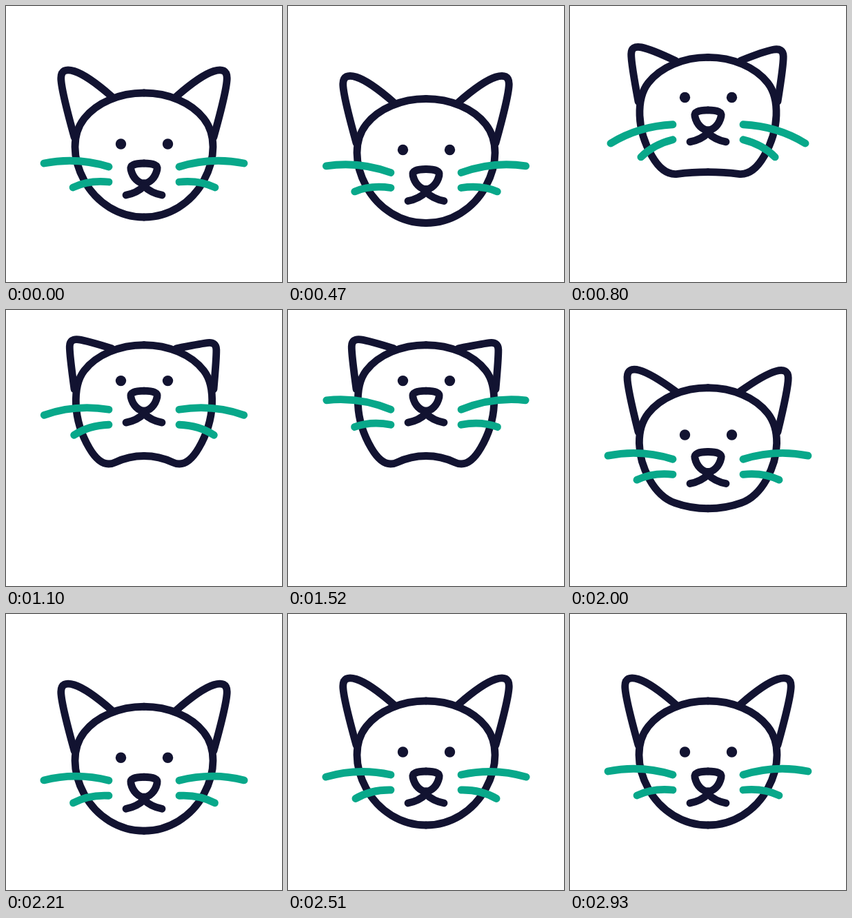
An HTML page with a canvas for the animation above (3.32 s loop, 400x400 px).

```html
<!DOCTYPE html>
<html lang="en">
<head>
<meta charset="utf-8">
<title>Jumping cat</title>
<style>
  html, body { margin: 0; width: 100%; height: 100%; overflow: hidden; background: #fff; }
  canvas { display: block; }
</style>
</head>
<body>
<canvas id="stage" width="400" height="400"></canvas>
<script>
const ctx = document.getElementById('stage').getContext('2d');
const INK = '#121331', TEAL = '#08a88a';
const LOOP = 3320, START = 230, END = 2930, STEP = 30;
const CROUCH = 200, LEAP = 470, APEX = 1310, DIP = 8.5;
const RAD = Math.PI / 180, MID = 200;

// How far each part climbs at the apex.
const SKULL = 87, CHIN = 107, EYES = 110, NOSE = 124, WHISKERS = 101;

const clamp = v => Math.min(1, Math.max(0, v));
const mix = (a, b, u) => a + (b - a) * u;

// Cubic timing curve: a gentle start and a long slow-down.
function ease(u) {
  const cubic = (a, b, s) => 3 * (1 - s) ** 2 * s * a + 3 * (1 - s) * s * s * b + s ** 3;
  let lo = 0, hi = 1;
  for (let i = 0; i < 24; i++) {
    const s = (lo + hi) / 2;
    if (cubic(0.233, 0.1875, s) < clamp(u)) lo = s; else hi = s;
  }
  return cubic(0, 1, lo);
}

// Whisker angle in degrees, as waves between turning points.
function swing(t) {
  const turns = [[CROUCH, 0], [440, -3.3], [770, 20], [1450, -5.3], [2540, 5], [END, 0]];
  const i = turns.findIndex(([end]) => t < end);
  if (i < 1) return 0;
  const [t0, a0] = turns[i - 1], [t1, a1] = turns[i];
  return mix(a0, a1, (1 - Math.cos(Math.PI * (t - t0) / (t1 - t0))) / 2);
}

// Smooth line from the first to the last point, guided by those between.
function curve(pts, color) {
  ctx.strokeStyle = color;
  ctx.beginPath();
  ctx.moveTo(...pts[0]);
  for (let i = 1; i < pts.length - 1; i++) {
    const [x, y] = pts[i], [nx, ny] = pts[i + 1];
    const last = i === pts.length - 2;
    ctx.quadraticCurveTo(x, y, last ? nx : (x + nx) / 2, last ? ny : (y + ny) / 2);
  }
  ctx.stroke();
}

// Draws a left-hand curve and its mirror image.
function pair(pts, color, move) {
  for (const right of [false, true]) {
    curve(pts.map((pt, i) => {
      const [x, y] = move(pt, right, i);
      return [right ? 2 * MID - x : x, y];
    }), color);
  }
}

// Guide point on an ellipse around the head centre: angle, height, rise, pull inwards.
const round = (deg, h, rise, pull = 0) => [
  MID - 100 * Math.cos(deg * RAD) / Math.cos(15 * RAD),
  200 + h * Math.sin(deg * RAD) / Math.cos(15 * RAD),
  rise, pull
];
const head = [
  [MID, 126, SKULL, 0],
  ...[-75, -45, -15].map(deg => round(deg, 74, SKULL)),
  round(15, 106, 70, 3), round(45, 106, 58, 12), round(75, 106, CHIN, 5),
  [MID, 306, CHIN, 0]
];
const ear = [
  [99, 190, SKULL, 0], [79.5, 120, 67, 13], [80, 88.5, 58, 13], [118, 100.5, 67, 0], [153, 131, SKULL, 0]
];
const nose = [[MID, 228], [179, 228], [183, 246], [194, 257], [MID, 257]];
const mouth = [[174, 274], [190, 271], [MID, 261]];
const whiskers = [
  [[149, 233], [102, 218.5], [55, 228]],
  [[149, 255], [120, 252], [97, 263]]
];

function draw(t) {
  // The landing repeats the take-off in reverse.
  const m = Math.min(t, 2 * APEX - t);
  const dip = DIP * ease((m - CROUCH) / (LEAP - CROUCH));
  const jump = ease((m - LEAP) / (APEX - LEAP));
  const lift = rise => dip - rise * jump;

  ctx.fillStyle = '#fff';
  ctx.fillRect(0, 0, 400, 400);
  ctx.lineWidth = 10.8;
  ctx.lineCap = ctx.lineJoin = 'round';

  const morph = ([x, y, rise, pull]) => [x + pull * jump, y + lift(rise)];
  pair(head, INK, morph);
  // The right ear folds a little further than the left.
  pair(ear, INK, (pt, right, i) => {
    const [x, y] = morph(pt);
    const fold = right && i > 0 && i < 4 ? jump : 0;
    return [x + 3 * fold, y + 5 * fold];
  });

  ctx.fillStyle = INK;
  for (const side of [-1, 1]) {
    ctx.beginPath();
    ctx.arc(MID + 0.5 + 34 * side, 200 + lift(EYES), 7.7, 0, 2 * Math.PI);
    ctx.fill();
  }

  for (const part of [nose, mouth]) pair(part, INK, ([x, y]) => [x, y + lift(NOSE)]);

  const c = Math.cos(swing(t) * RAD), s = Math.sin(swing(t) * RAD);
  for (const hair of whiskers) {
    const [rx, ry] = hair[0];
    pair(hair, TEAL, ([x, y]) => [
      rx + (x - rx) * c + (y - ry) * s,
      ry - (x - rx) * s + (y - ry) * c + lift(WHISKERS)
    ]);
  }
}

let begin;
function tick(now) {
  begin ??= now;
  const t = (now - begin) % LOOP;
  draw(t < START ? 0 : Math.min(END, START + Math.floor((t - START) / STEP) * STEP));
  requestAnimationFrame(tick);
}
draw(0);
requestAnimationFrame(tick);
</script>
</body>
</html>
```
